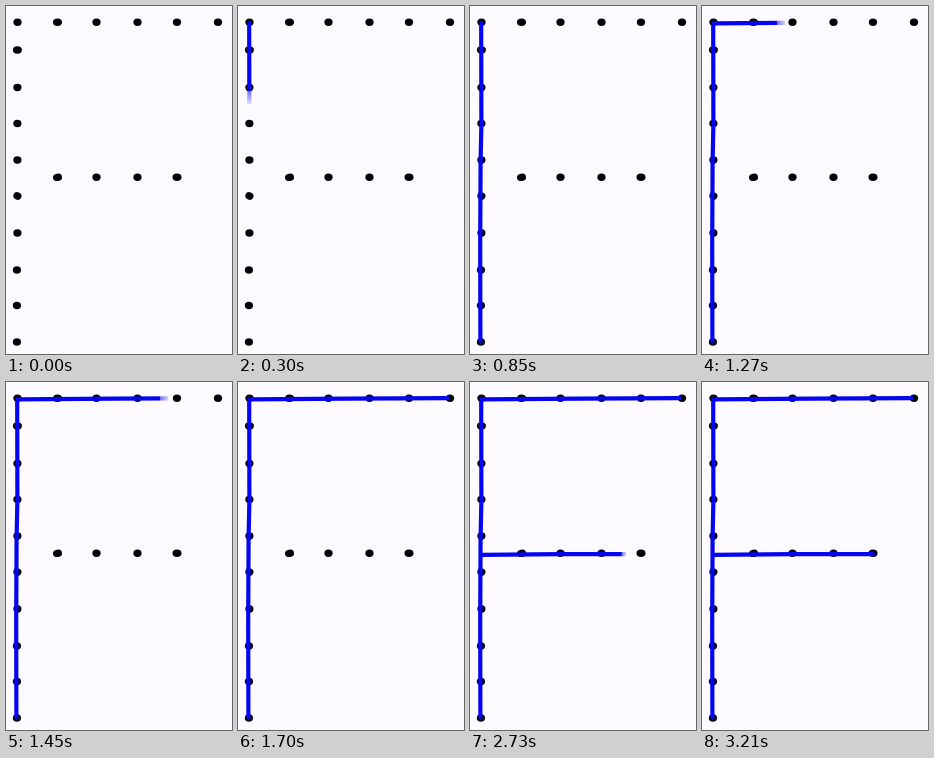
Recreate the animation shown at these times as an HTML page with a canvas. Size 226 by 348 pixels, loop 3.27 s.

```html
<!DOCTYPE html>
<html lang="en">
<head>
<meta charset="utf-8">
<title>Letter F</title>
<style>
html, body { margin: 0; width: 100%; height: 100%; overflow: hidden; background: #fdfbff; }
canvas { display: block; }
</style>
</head>
<body>
<canvas id="stage" width="226" height="348"></canvas>
<script>
const ctx = document.getElementById('stage').getContext('2d');
const LOOP = 3270, WIPE = 460;
const BLUE = '#0505f0';
const stemY = [44, 81.5, 117.5, 154, 190, 227, 264, 299.5, 336];
const topX = [11.5, 51.5, 90.5, 131.5, 171, 212];
const midX = [51.5, 90.5, 131.5, 171];

// Each stroke is revealed from its first point to its last.
const strokes = [
  { start: 193, vertical: true, feather: 14, from: 15, to: 337,
    points: [[11.2, 17], [11.4, 118], [10.6, 155], [10.2, 240], [10.4, 335]] },
  { start: 1114, vertical: false, feather: 9, from: 10, to: 212,
    points: [[11.5, 17.3], [110, 16.6], [210, 16.2]] },
  { start: 2328, vertical: false, feather: 5, from: 11, to: 174,
    points: [[12, 172.8], [90, 172.2], [171, 172.2]] }
];

function dot(x, y, rx = 4.1, tilt = 0) {
  ctx.beginPath();
  ctx.ellipse(x, y, rx, 3.7, tilt, 0, Math.PI * 2);
  ctx.fill();
}

function drawDots() {
  ctx.fillStyle = '#020204';
  stemY.forEach((y, i) => dot(i < 6 ? 11.4 : 10.9, y, i ? 4.1 : 4.5, i === 4 ? 0.35 : 0));
  topX.forEach((x, i) => dot(x, 16.3, i === 1 ? 4.5 : 4.1));
  midX.forEach((x, i) => dot(x, 171.3, i % 3 ? 4.1 : 4.5, i ? 0 : -0.15));
}

function fade(s, edge) {
  const a = edge - s.feather / 2, b = edge + s.feather / 2;
  const g = s.vertical ? ctx.createLinearGradient(0, a, 0, b)
                       : ctx.createLinearGradient(a, 0, b, 0);
  g.addColorStop(0, BLUE);
  g.addColorStop(0.1, 'rgba(5,5,240,0.55)');
  g.addColorStop(1, 'rgba(5,5,240,0.15)');
  g.addColorStop(1, 'rgba(5,5,240,0)');
  return g;
}

function drawStroke(s, t) {
  const p = (t - s.start) / WIPE;
  if (p <= 0) return;
  ctx.strokeStyle = p >= 1 ? BLUE : fade(s, s.from + (s.to - s.from) * p);
  ctx.beginPath();
  s.points.forEach(([x, y]) => ctx.lineTo(x, y));
  ctx.stroke();
}

function draw(now) {
  const t = now % LOOP;
  ctx.fillStyle = '#fdfbff';
  ctx.fillRect(0, 0, 226, 348);
  drawDots();
  ctx.lineWidth = 4.2;
  ctx.lineCap = ctx.lineJoin = 'round';
  strokes.forEach(s => drawStroke(s, t));
}

const begin = performance.now();
function tick() {
  draw(performance.now() - begin);
  requestAnimationFrame(tick);
}
tick();
</script>
</body>
</html>
```
